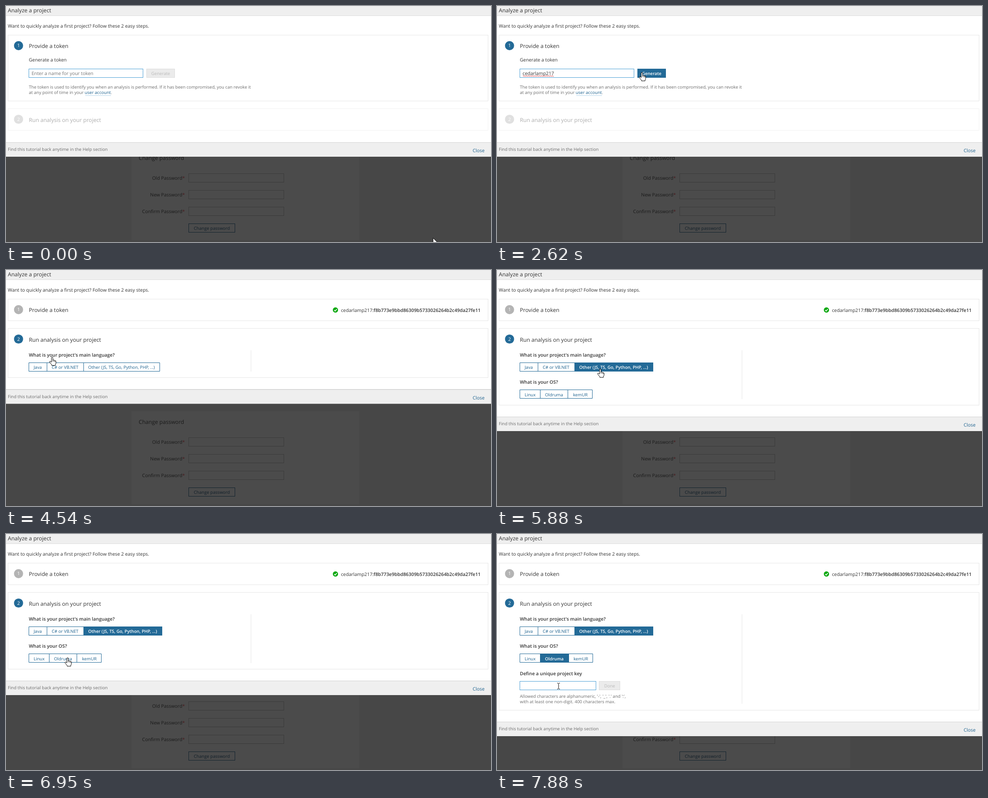
Recreate the animation shown at these times as an HTML page. Size 1071 px wide and 523 px high, loop 8 s.

```html
<!DOCTYPE html>
<html lang="en">
<head>
<meta charset="utf-8">
<title>Analyze a project</title>
<style>
html, body { margin: 0; width: 100%; height: 100%; overflow: hidden; background: #474747; }
svg { display: block; width: 1071px; height: 523px; }
text { font: 10.4px "Open Sans", "Noto Sans", sans-serif; fill: #333; text-rendering: geometricPrecision; white-space: pre; }
.h { font-size: 12.1px; }
.s { font-size: 9.58px; fill: #6c6c6c; }
.bold { font-weight: 600; }
.b { font-size: 9.6px; fill: #1c618e; }
.on { font-size: 9.6px; font-weight: 600; fill: #fff; }
.off { fill: #bbb; }
.mid { text-anchor: middle; }
.end { text-anchor: end; }
.link { fill: #1c618e; }
.num { fill: #fff; text-anchor: middle; }
.box { fill: #fff; stroke: #e6e6e6; }
.field { fill: #fff; stroke: #4b9fd5; }
.btn { fill: #fff; stroke: #236a97; }
.fill { fill: #236a97; stroke: #236a97; }
.dead { fill: #ebebeb; stroke: #ddd; }
.caret { stroke: #222; }
.bar { fill: #efefef; }
.under { stroke: #b5d5ea; }
.dim text { fill: #1a1a1a; }
.dim rect { fill: none; stroke: #3a3a3a; }
.dim .card { fill: #4b4b4b; stroke: none; }
.dim .save { stroke: #14242f; }
.dim .navy { fill: #111f29; font-size: 9.6px; }
.red { fill: #471c1e; }
</style>
</head>
<body>
<svg viewBox="0 0 1071 523">
  <rect width="1071" height="523" fill="#474747"/>
  <g class="dim">
    <rect class="card" x="277" y="313" width="503" height="206"/>
    <text class="h" x="293" y="341">Change password</text>
    <text class="end" x="395" y="384.5">Old Password<tspan class="red">*</tspan></text>
    <text class="end" x="395" y="421.5">New Password<tspan class="red">*</tspan></text>
    <text class="end" x="395" y="458.5">Confirm Password<tspan class="red">*</tspan></text>
    <rect x="403.5" y="371.5" width="210" height="19"/>
    <rect x="403.5" y="408.5" width="210" height="19"/>
    <rect x="403.5" y="445.5" width="210" height="19"/>
    <rect class="save" x="403.5" y="482.5" width="102" height="19"/>
    <text class="navy mid" x="454.5" y="496">Change password</text>
  </g>

  <rect id="page" width="1071" fill="#fff"/>
  <rect class="bar" width="1071" height="21"/>
  <path d="M0 21.5H1071" stroke="#ddd"/>
  <text class="h" x="4" y="13.5">Analyze a project</text>
  <text x="4" y="48">Want to quickly analyze a first project? Follow these 2 easy steps.</text>

  <rect id="one" class="box" x="4.5" y="64.5" width="1060"/>
  <circle id="dot1" cx="27.7" cy="87.8" r="10.1"/>
  <text class="num" x="27.7" y="91.3">1</text>
  <text class="h" x="50.5" y="93">Provide a token</text>

  <g data-t="0-2840">
    <text x="50.5" y="122.7">Generate a token</text>
    <rect class="field" x="50.5" y="139.5" width="252" height="19"/>
    <text data-t="0-2000" x="56.5" y="153" style="fill:#757575">Enter a name for your token</text>
    <g data-t="2000-2840">
      <text x="56.5" y="153">cedarlamp217</text>
      <path d="M57 154.8H125" stroke="#e04040" stroke-dasharray="2 2"/>
      <path d="M59 155.8H125" stroke="#e04040" stroke-dasharray="2 2"/>
    </g>
    <path class="caret" data-t="140-690,1220-1770" d="M56.5 142V156"/>
    <path class="caret" data-t="2000-2530" d="M126.5 142V156"/>
    <g data-t="0-2000,2760-2840">
      <rect class="dead" x="310.5" y="139.5" width="62" height="19"/>
      <text class="b off mid" x="341.5" y="153">Generate</text>
    </g>
    <g data-t="2000-2760">
      <rect class="btn" x="310.5" y="139.5" width="62" height="19"/>
      <text class="b mid" x="341.5" y="153">Generate</text>
    </g>
    <g data-t="2000-2760" data-hover>
      <rect class="fill" x="310.5" y="139.5" width="62" height="19"/>
      <text class="on mid" x="341.5" y="153">Generate</text>
    </g>
  </g>

  <g id="note">
    <text class="s" x="50.5" y="183">The token is used to identify you when an analysis is performed. If it has been compromised, you can revoke it</text>
    <text class="s" x="50.5" y="195">at any point of time in your <tspan class="link">user account</tspan>.</text>
    <path class="under" d="M175 198.5H232"/>
  </g>

  <g data-t="2840-4390">
    <text x="50.5" y="124.5">cedarlamp217: <tspan class="bold">f8b773e9bbd86309b5733026264b2c49da27fe11</tspan></text>
    <path d="M371.8 116.8L379.6 124.6M379.6 116.8L371.8 124.6" stroke="#a8321f" stroke-width="2.4"/>
    <rect class="btn" x="50.5" y="180.5" width="63" height="19"/>
    <text class="b mid" x="82" y="193.8">Continue</text>
    <g data-t="3620-4390" data-hover>
      <rect class="fill" x="50.5" y="180.5" width="63" height="19"/>
      <text class="on mid" x="82" y="193.8">Continue</text>
    </g>
  </g>

  <g data-t="4390-8000">
    <circle cx="727.5" cy="88.6" r="5.8" fill="#0aa80f"/>
    <path d="M724.6 88.8L726.8 91L730.6 86.6" fill="none" stroke="#fff" stroke-width="1.6"/>
    <text class="end" x="1048" y="92.7">cedarlamp217:<tspan class="bold">f8b773e9bbd86309b5733026264b2c49da27fe11</tspan></text>
  </g>

  <rect id="two" class="box" x="4.5" width="1060"/>
  <g id="head2">
    <circle id="dot2" cx="27.7" cy="23.5" r="10.1"/>
    <text class="num" x="27.7" y="27">2</text>
    <text class="h" x="50.5" y="29">Run analysis on your project</text>
  </g>
  <path id="rule" stroke="#e6e6e6"/>

  <g data-t="4390-8000">
    <text class="bold" x="50.5" y="191.7">What is your project's main language?</text>
    <path class="btn" data-t="4390-5880" d="M50.5 205.5H339.5V224.5H50.5Z"/>
    <path class="btn" d="M50.5 205.5H171.5V224.5H50.5ZM90.5 205.5V224.5"/>
    <text class="b" x="61" y="219">Java</text>
    <text class="b" x="101" y="219">C# or VB.NET</text>
    <text class="b" data-t="4390-5880" x="181.5" y="219">Other (JS, TS, Go, Python, PHP, ...)</text>
  </g>

  <g data-t="5880-8000">
    <rect class="fill" x="171.5" y="205.5" width="173" height="19"/>
    <text class="on" x="181.5" y="219">Other (JS, TS, Go, Python, PHP, ...)</text>
    <text class="bold" x="50.5" y="252.3">What is your OS?</text>
    <path class="btn" data-t="5880-7020" d="M50.5 265.5H210.5V284.5H50.5ZM95.5 265.5V284.5M156.5 265.5V284.5"/>
    <path class="btn" data-t="7020-8000" d="M50.5 265.5H211.5V284.5H50.5Z"/>
    <text class="b" x="61" y="279.5">Linux</text>
    <g data-t="5880-7020">
      <text class="b" x="106" y="279.5">Oldruma</text>
      <text class="b" x="168" y="279.5">kemUR</text>
    </g>
  </g>

  <g data-t="7020-8000">
    <rect class="fill" x="95.5" y="265.5" width="63" height="19"/>
    <text class="on" x="106" y="279.5">Oldruma</text>
    <text class="b" x="169" y="279.5">kemUR</text>
    <text class="bold" x="50.5" y="313">Define a unique project key</text>
    <rect class="field" x="50.5" y="326.5" width="168" height="19"/>
    <path class="caret" data-t="7020-7550" d="M56.5 329V343"/>
    <rect class="dead" x="225.5" y="326.5" width="46" height="19"/>
    <text class="b off mid" x="248.7" y="340">Done</text>
    <text class="s" x="50.5" y="363">Allowed characters are alphanumeric, '-', '_', '.' and ':',</text>
    <text class="s" x="50.5" y="375">with at least one non-digit. 400 characters max.</text>
  </g>

  <g id="foot">
    <rect class="bar" width="1071" height="32"/>
    <path d="M0 .5H1071" stroke="#d4d4d4"/>
    <text class="s" x="4" y="19">Find this tutorial back anytime in the Help section</text>
    <text class="link" x="1030.5" y="22">Close</text>
  </g>

  <g id="cursor" stroke="#000">
    <path id="arrow" fill="#fff" d="M0 0V13.4L3 10.6L5.2 15.6L7.4 14.6L5.3 9.8H9.6Z"/>
    <g id="hand">
      <path fill="#fff" d="M-1.6 1Q-1.6 -.6 0 -.6Q1.5 -.6 1.5 1V6Q3.8 5 4.3 6.8Q6 6 6.6 7.6Q8.3 7.2 8.4 9V12.5Q8.2 14.5 7 16V18H-1V16.5L-5 11.5Q-6.6 9.5 -5.2 8.8Q-3.6 8.3 -1.6 10.6Z"/>
      <path fill="none" stroke-width=".8" d="M1.5 6V9.5M4.3 7V10M6.6 8V10.3"/>
    </g>
    <path id="beam" fill="none" d="M-3 -6.5H-1L0 -5.5L1 -6.5H3M0 -5.5V5.5M-3 6.5H-1L0 5.5L1 6.5H3"/>
  </g>
</svg>
<script>
const LOOP = 8000;
const $ = id => document.getElementById(id);
const set = (id, attrs) => { for (const k in attrs) $(id).setAttribute(k, attrs[k]); };
const show = (el, on) => { el.style.display = on ? '' : 'none'; };

// Layout per stage: start, first panel bottom, second panel top and bottom, footer top, divider bottom
const stages = [
  [0, 210.5, 227.5, 275.5, 302, 0],
  [2840, 213.5, 231.5, 279.5, 305, 0],
  [4390, 112.5, 129.5, 238.5, 264.5, 225],
  [5880, 112.5, 129.5, 299.5, 325, 286],
  [7020, 112.5, 129.5, 390.5, 416, 376]
];

// Pointer moves: first step, last step, step count, goal
const moves = [
  [70, 730, 10, 167, 149],
  [900, 980, 2, 180, 155],
  [2090, 2620, 8, 320, 148],
  [3620, 4000, 6, 124, 191],
  [4080, 4160, 2, 102, 193.5],
  [5090, 5490, 6, 228, 220],
  [6090, 6640, 8, 142, 270],
  [6720, 6720, 1, 136, 275],
  [7250, 7570, 5, 127, 333],
  [7800, 7800, 1, 141, 339],
  [7880, 7880, 1, 136, 337]
];

const timed = [...document.querySelectorAll('[data-t]')].map(el => ({
  el,
  hover: 'hover' in el.dataset,
  spans: el.dataset.t.split(',').map(s => s.split('-').map(Number))
}));

function pointer(t) {
  let x = 943, y = 514;
  for (const [from, to, n, gx, gy] of moves) {
    if (t < from) break;
    const step = to > from ? (t - from) / (to - from) * (n - 1) : 0;
    const p = Math.min(1, (1 + Math.floor(step + 1e-6)) / n);
    const e = p * p * (3 - 2 * p);
    x += (gx - x) * e;
    y += (gy - y) * e;
  }
  return [x, y];
}

function shape(t, x, y) {
  const over = (l, top, r, b) => x >= l && x <= r && y >= top && y <= b;
  if (t < 2840) {
    if (over(50, 139, 303, 160)) return 'beam';
    return t >= 2000 && over(310, 139, 373, 160) ? 'hand' : 'arrow';
  }
  if (t < 3160) return 'hand';
  if (t < 4390) {
    if (over(50, 179, 114, 200)) return 'hand';
    return over(50, 144, 541, 169) ? 'beam' : 'arrow';
  }
  if (t < 5090 || over(50, 205, 345, 225) || over(50, 265, 211, 286)) return 'hand';
  return t >= 7020 && over(50, 326, 219, 346) ? 'beam' : 'arrow';
}

function render(t) {
  const [, oneEnd, top, end, foot, rule] = stages.filter(s => s[0] <= t).pop();
  const second = t >= 4390;
  set('page', { height: foot });
  set('one', { height: oneEnd - 64.5 });
  set('dot1', { fill: second ? '#b4b4b4' : '#236a97' });
  set('two', { y: top, height: end - top, opacity: second ? 1 : .5 });
  set('head2', { transform: `translate(0 ${top})`, opacity: second ? 1 : .4 });
  set('dot2', { fill: second ? '#236a97' : '#b4b4b4' });
  set('rule', { d: rule ? `M541 178V${rule}` : '' });
  set('foot', { transform: `translate(0 ${foot})` });
  set('note', { transform: `translate(0 ${t < 2840 ? 0 : -30})` });
  show($('note'), !second);

  const [x, y] = pointer(t);
  const kind = shape(t, x, y);
  set('cursor', { transform: `translate(${x} ${y})` });
  for (const k of ['arrow', 'hand', 'beam']) show($(k), k === kind);
  for (const { el, hover, spans } of timed)
    show(el, spans.some(([a, b]) => t >= a && t < b) && (!hover || kind === 'hand'));
}

const start = performance.now();
function frame() {
  render((performance.now() - start) % LOOP);
  requestAnimationFrame(frame);
}
frame();
</script>
</body>
</html>
```
